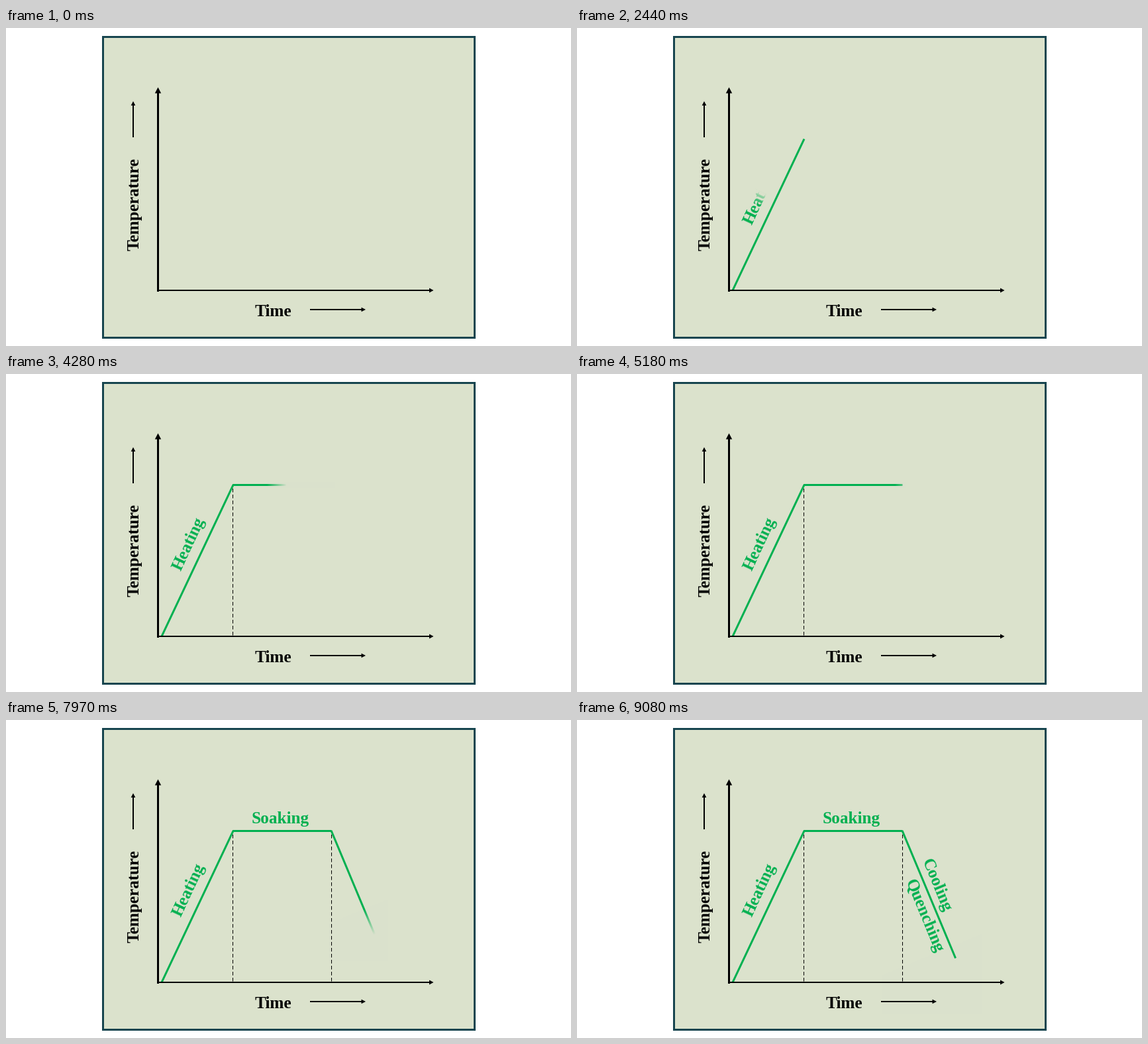
Write a matplotlib script that moves like this. It is 853 by 480 pixels and loops after 9.34 s.

```python
import numpy as np
import matplotlib.pyplot as plt
from matplotlib.animation import FuncAnimation
from matplotlib.patches import Polygon, Rectangle

W, H, DPI = 853, 480, 64
LOOP, TICK = 9340, 20
STEP = 60          # ms between wipe steps
SOFT = 0.2         # soft edge as a share of the wiped length
PANEL, BORDER, GREEN = "#dbe2cc", "#17454f", "#00b050"
PX = 72 / DPI
TEXT_SIZE = 25.2 * PX

plt.rcParams["path.snap"] = False
fig = plt.figure(figsize=(W / DPI, H / DPI), dpi=DPI, facecolor="white")
ax = fig.add_axes([0, 0, 1, 1])
ax.axis("off")


def line(a, b, width, color, z, **kw):
    return ax.plot([a[0], b[0]], [a[1], b[1]], color=color, lw=width * PX,
                   solid_capstyle="butt", dash_capstyle="butt", zorder=z, **kw)[0]


def label(text, x, y, color, angle, z):
    return ax.text(x, y, text, family="Liberation Serif", weight="bold",
                   size=TEXT_SIZE, color=color, rotation=angle, ha="center",
                   va="baseline", rotation_mode="anchor", zorder=z)


def arrow(a, b, width, head, half):
    """Straight black arrow from a to its tip b."""
    a, b = np.array(a, float), np.array(b, float)
    u = (b - a) / np.hypot(*(b - a))
    n = np.array([-u[1], u[0]])
    base = b - head * u
    line(a, base + u, width, "black", 100)
    ax.add_patch(Polygon([b, base + half * n, base - half * n],
                         fc="black", lw=0, zorder=100))


class Wipe:
    """Artists revealed along the direction from a to b."""

    def __init__(self, start, steps, a, b, artists, pad=4):
        self.start, self.steps = start, steps
        self.a, self.b = np.array(a, float), np.array(b, float)
        self.artists, self.pad = artists, pad

    def progress(self, t):
        k = (t - self.start) // STEP + 1
        return min(max(k, 0), self.steps) / self.steps


# Panel and axes
ax.add_patch(Rectangle((146.5, 13.5), 561, 454, fc=PANEL, lw=0, zorder=0))
ax.add_patch(Rectangle((146.5, 13.5), 561, 454, fc="none", ec=BORDER,
                       lw=3 * PX, zorder=99))
arrow((229.5, 398), (229.5, 89.5), 3, 9, 4.7)
arrow((228, 396), (645.5, 396), 2, 6.5, 3.5)
arrow((192, 165), (192, 110.5), 2, 6.5, 3.3)
arrow((459, 425), (543, 425), 2, 6.5, 3.3)
label("Temperature", 201, 266.5, "black", 90, 100)
label("Time", 403.5, 435, "black", 0, 100)

# Curve corners
A, B, C, D = (235, 396), (343, 167.5), (491.5, 167.5), (571.5, 359.5)


def curve(a, b, z):
    return [line(a, b, 3, GREEN, z)]


def drop(x, z):
    return [line((x, 173), (x, 396), 1, "black", z, dashes=(5.5, 3.5))]


# Earlier parts lie above later ones, so the cover hides only its own part.
wipes = [
    Wipe(260, 31, A, B, curve(A, B, 50)),
    Wipe(2260, 8, (261.4, 304.8), (303.6, 214.2),
         [label("Heating", 282.5, 259.2, GREEN, 65, 48)], 24),
    Wipe(2880, 8, (342.5, 396), (342.5, 168), drop(342.5, 46)),
    Wipe(3500, 31, B, C, curve((342, B[1]), C, 44)),
    Wipe(5520, 8, (306, 150), (522, 150),
         [label("Soaking", 414.2, 156, GREEN, 0, 42)], 20),
    Wipe(6150, 8, (491.5, 396), (491.5, 168), drop(491.5, 40)),
    Wipe(6770, 31, C, D, curve((491, 167), D, 38)),
    Wipe(8780, 8, (484, 171), (587.5, 420),
         [label("Cooling", 536.9, 252.5, GREEN, -67.5, 36),
          label("Quenching", 517.8, 298.2, GREEN, -67.5, 36)], 24),
]

cover = ax.imshow(np.zeros((1, 1, 4)), extent=(0, 1, 1, 0), aspect="auto",
                  interpolation="bilinear")
ax.set_xlim(0, W)
ax.set_ylim(H, 0)
PANEL_RGB = [int(PANEL[i:i + 2], 16) / 255 for i in (1, 3, 5)]


def place_cover(w, p):
    """Hide the unrevealed side of a part with a soft panel-coloured sheet."""
    x0, y0 = np.floor(np.minimum(w.a, w.b) - w.pad).astype(int)
    x1, y1 = np.ceil(np.maximum(w.a, w.b) + w.pad).astype(int)
    y, x = np.mgrid[y0:y1, x0:x1] + 0.5
    d = w.b - w.a
    along = ((x - w.a[0]) * d[0] + (y - w.a[1]) * d[1]) / (d @ d)
    sheet = np.empty(x.shape + (4,))
    sheet[..., :3] = PANEL_RGB
    sheet[..., 3] = 1 - np.clip((p * (1 + SOFT) - along) / SOFT, 0, 1)
    cover.set_data(sheet)
    cover.set_extent((x0, x1, y1, y0))
    cover.set_zorder(w.artists[0].get_zorder() + 1)


def draw(i):
    t = i * TICK + TICK // 2
    cover.set_visible(False)
    for w in wipes:
        p = w.progress(t)
        for art in w.artists:
            art.set_visible(p > 0)
        if 0 < p < 1:
            place_cover(w, p)
            cover.set_visible(True)
    return [cover] + [art for w in wipes for art in w.artists]


anim = FuncAnimation(fig, draw, frames=LOOP // TICK, interval=TICK,
                     init_func=lambda: draw(0), repeat=True, repeat_delay=0)
plt.show()
```
